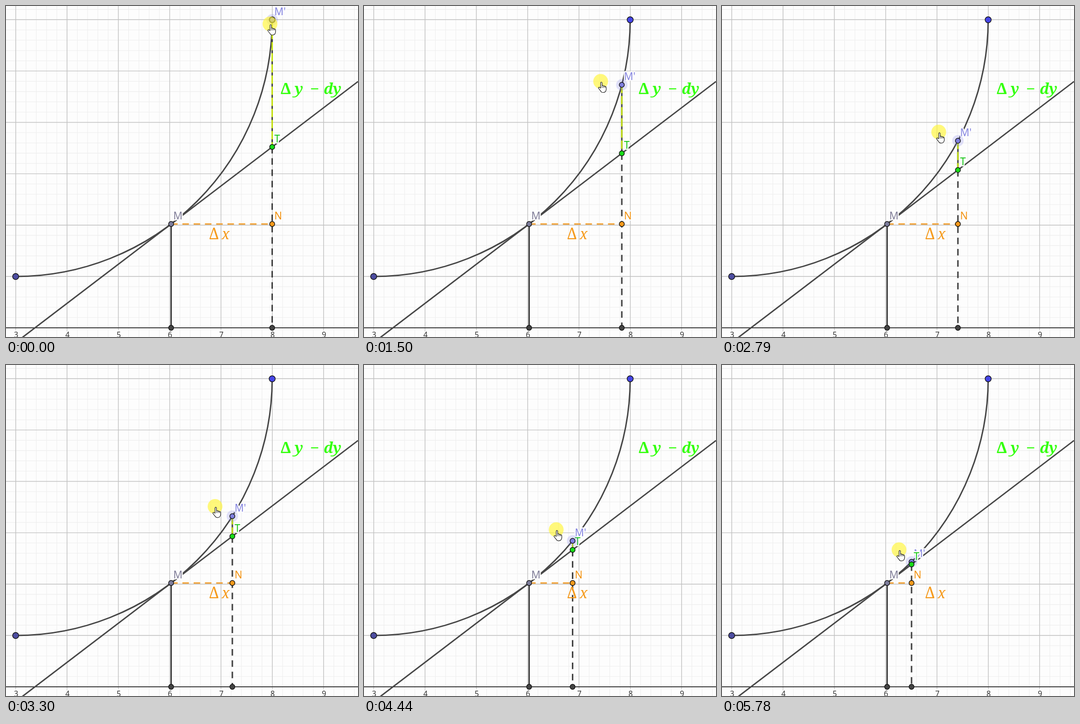
These frames come from a looping animation (728 px wide and 684 px high, 5.87 s). An HTML page with a canvas:

```html
<!DOCTYPE html>
<html>
<head>
<meta charset="utf-8">
<style>
html, body { margin: 0; width: 100%; height: 100%; overflow: hidden; background: #fdfdfd; }
canvas { display: block; }
</style>
</head>
<body>
<canvas id="stage" width="728" height="684"></canvas>
<script>
const ctx = document.getElementById('stage').getContext('2d');
const LOOP = 5870, STEP = 71.3, LAST_STEP = 81;
const UNIT = 106.1, LEFT = 20, TOP = 28.5, RADIUS = 530.5, AXIS = 665;
const M = { x: 341.5, y: 450.5 };
const SLOPE = (M.x - LEFT) / (M.y - TOP);
const INK = '#464646';
const tangentY = x => M.y - (x - M.x) * SLOPE;

// Drag path: seconds, angle of M' on the arc, cursor x, cursor y
const PATH = [
  [0, 0, 546, 37], [.64, .095, 521.5, 80], [.94, .158, 507, 109],
  [1.28, .211, 497.5, 134], [1.93, .346, 473.5, 199], [2.01, .3614, 470, 205],
  [2.58, .4605, 454, 248.5], [2.79, .492, 448, 261], [3.23, .559, 434, 290],
  [3.87, .6327, 413, 320], [4.44, .685, 397, 341], [5.14, .745, 381, 364],
  [5.78, .794, 366, 382]
];

function pose(seconds) {
  let i = 1;
  while (i < PATH.length - 1 && PATH[i][0] < seconds) i++;
  const a = PATH[i - 1], b = PATH[i];
  const k = Math.min(1, (seconds - a[0]) / (b[0] - a[0]));
  return a.map((v, j) => v + (b[j] - v) * k);
}

function line(x1, y1, x2, y2, color = INK, width = 2.9, dash = []) {
  ctx.beginPath();
  ctx.moveTo(x1, y1);
  ctx.lineTo(x2, y2);
  ctx.strokeStyle = color;
  ctx.lineWidth = width;
  ctx.setLineDash(dash);
  ctx.stroke();
  ctx.setLineDash([]);
}

function disc(x, y, r, fill, outlined) {
  ctx.beginPath();
  ctx.arc(x, y, r, 0, 7);
  ctx.fillStyle = fill;
  ctx.fill();
  if (!outlined) return;
  ctx.strokeStyle = '#111';
  ctx.lineWidth = 1.4;
  ctx.stroke();
}

const dot = (x, y, fill, r = 5.2) => disc(x, y, r, fill, true);

function text(str, x, y, color, font, halo) {
  ctx.font = font;
  ctx.lineJoin = 'round';
  if (halo) {
    ctx.strokeStyle = '#fdfdfd';
    ctx.lineWidth = 5;
    ctx.strokeText(str, x, y);
  }
  ctx.fillStyle = color;
  ctx.fillText(str, x, y);
}

const label = (str, x, y, color) =>
  text(str, x + 4.5, y - 9.5, color, '21px "Noto Sans", sans-serif', true);

function formula(parts, y, color, weight) {
  for (const [str, x] of parts) {
    const style = str === 'Δ' ? '33px' : str === '−' ? '32px' : 'italic 30px';
    text(str, x, y, color, `${weight} ${style} "Noto Serif", serif`);
  }
}

function grid() {
  ctx.fillStyle = '#fdfdfd';
  ctx.fillRect(0, 0, 728, 684);
  for (const major of [false, true]) {
    const gap = major ? UNIT : UNIT / 5;
    const color = major ? '#c2c2c2' : '#eeeeee';
    const width = major ? 1.4 : 1.1;
    for (let x = LEFT % gap + .2; x < 728; x += gap) line(x, 0, x, 684, color, width);
    for (let y = TOP % gap - .2; y < 684; y += gap) line(0, y, 728, y, color, width);
  }
  line(0, AXIS, 728, AXIS, '#404040', 1.8);
  ctx.textAlign = 'center';
  for (let n = 3; n <= 9; n++) {
    text(n, LEFT + (n - 3) * UNIT + 1, 685, '#333', '15.5px "Noto Sans", sans-serif', true);
  }
  ctx.textAlign = 'left';
}

function cursor(x, y) {
  disc(x, y, 15.3, 'rgba(255,244,60,.68)');
  ctx.save();
  ctx.translate(x - 7, y + 1);
  const hand = new Path2D('M7 13V2.5Q7 .5 8.5 .5Q10 .5 10 2.5V8' +
    'Q12.5 6.5 13 9Q15.5 7.8 16 10Q18.5 9 18.5 12V16Q18 19 16.5 20.5' +
    'Q15 22 11.5 22Q8.5 22 7 19L2.7 13.5Q2 11.5 4 11.2Q5.5 11.5 7 13Z');
  ctx.fillStyle = '#fff';
  ctx.fill(hand);
  ctx.strokeStyle = '#222';
  ctx.lineWidth = 1.2;
  ctx.stroke(hand);
  for (const k of [10, 13, 16]) line(k, 8.5, k, 12.5, '#222', 1);
  ctx.restore();
}

function draw(seconds) {
  const [, angle, cx, cy] = pose(seconds);
  const x = LEFT + RADIUS * Math.cos(angle);
  const y = TOP + RADIUS * Math.sin(angle);
  const ty = tangentY(x);

  grid();
  ctx.beginPath();
  ctx.arc(LEFT, TOP, RADIUS, 0, Math.PI / 2);
  ctx.strokeStyle = INK;
  ctx.lineWidth = 2.9;
  ctx.stroke();
  line(0, tangentY(0), 728, tangentY(728));
  line(M.x, M.y, M.x, AXIS, '#404040', 3);
  line(M.x, M.y, x, M.y, '#f2a742', 3, [13.5, 9.8]);
  line(x, y, x, ty, INK, 3);
  line(x, ty, x, AXIS, '#404040', 3, [13.5, 9.8]);
  line(x, y, x, ty, '#c3e010', 3, [17, 6]);

  label('M', M.x, M.y, '#807d98');
  label("M'", x, y, '#8585e0');
  label('T', x, ty, '#12c412');
  label('N', x, M.y, '#f29210');
  formula([['Δ', 420], ['x', 446]], 482, '#f59a1c', 'normal');
  formula([['Δ', 567], ['y', 597], ['−', 629], ['d', 657], ['y', 676]], 182, '#33ff0c', 'bold');

  dot(LEFT, 559, '#4d4da0', 6.3);
  dot(LEFT + RADIUS, TOP, '#4646e6', 6.3);
  dot(M.x, AXIS, '#444');
  dot(x, AXIS, '#444');
  dot(M.x, M.y, '#7d7d9c');
  disc(x, y, 11.8, 'rgba(110,110,235,.2)');
  dot(x, y, '#7f7fe0');
  dot(x, ty, '#18dc18');
  dot(x, M.y, '#f59a1c');
  cursor(cx, cy);
}

function tick(now) {
  const step = Math.min(LAST_STEP, Math.floor(now % LOOP / STEP));
  draw(step * STEP / 1000);
  requestAnimationFrame(tick);
}
requestAnimationFrame(tick);
</script>
</body>
</html>
```
